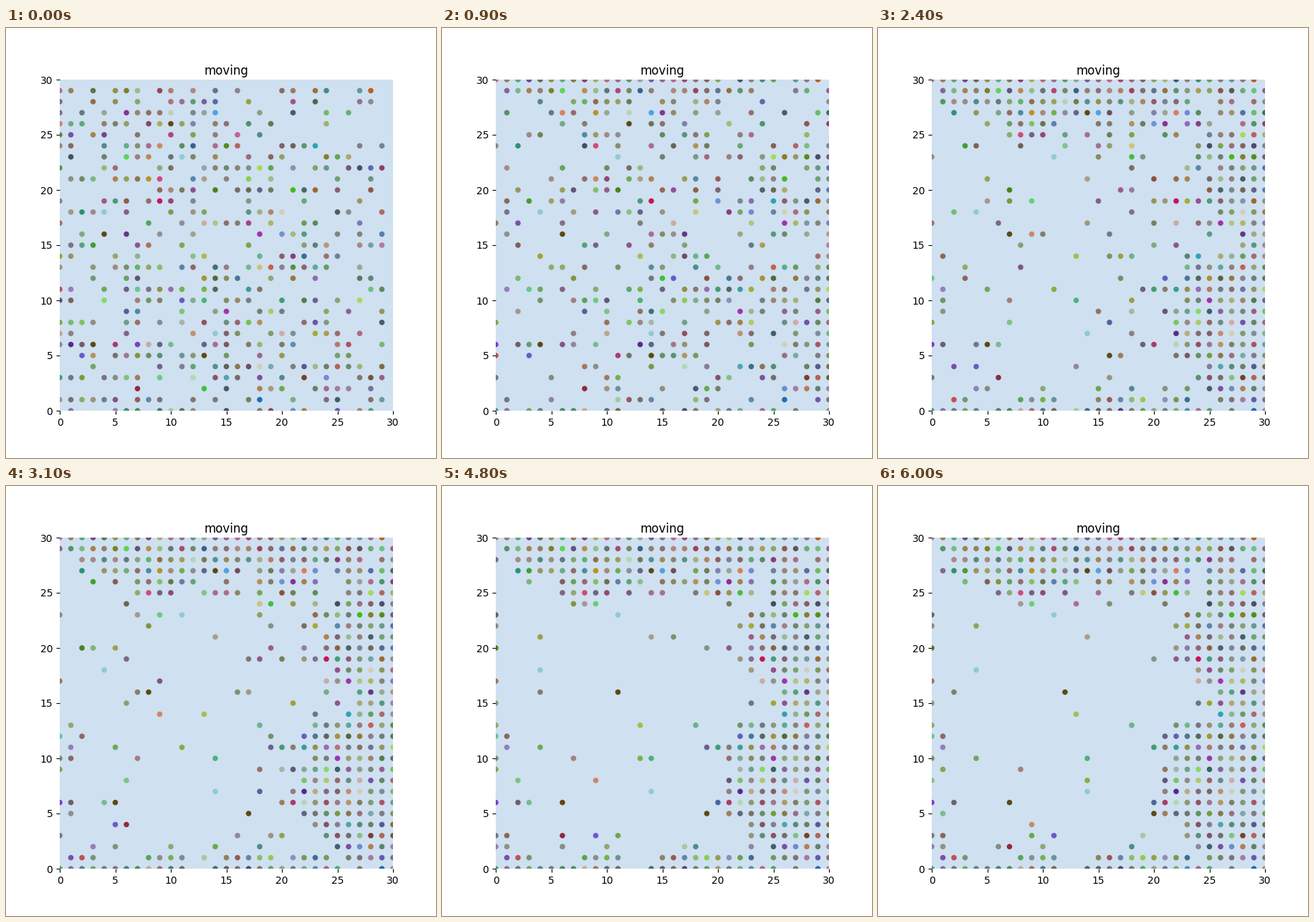
A matplotlib script that plays this animation: 600 by 600 pixels, repeating every 6100 ms.

```python
import random

import matplotlib.pyplot as plt
import numpy as np
from matplotlib.animation import FuncAnimation
from matplotlib.colors import to_rgb

SIZE = 30        # walls stand at 0 and SIZE
COUNT = 450
FRAMES = 61
INTERVAL = 100
REACH = 4        # how far a dot may hop to pass others

RIGHT, LEFT, UP, DOWN = (1, 0), (-1, 0), (0, 1), (0, -1)
STILL = (0, 0)

random.seed(12)

CYAN, UMBER, SAND = "#8fcad4", "#5c4a14", "#d5cdb8"
MINT, LIME, VIOLET = "#b3d6b3", "#a3dc55", "#a035ac"

# Striking dots: x, y, colour, heading, speed ahead, drift to the far side
LEADS = [
    (11, 23, CYAN, STILL, 0, 0),
    (4, 18, CYAN, STILL, 0, 0),
    (14, 7, CYAN, STILL, 0, 0),
    (1, 11, "#957fbf", STILL, 0, 0),
    (13, 10, "#4db37a", RIGHT, 0.02, 0),
    (9, 19, "#c8145c", RIGHT, 0.42, 0),
    (9, 21, "#d04a7a", UP, 0.21, 0.14),
    (6, 23, "#5fd455", UP, 0.6, 0.1),
    (14, 27, "#4fa3e0", UP, 0.12, 0.2),
    (18, 22, LIME, RIGHT, 0.65, 0.45),
    (27, 10, LIME, RIGHT, 0.22, 0.21),
    (20, 18, SAND, RIGHT, 0.45, 0.2),
    (18, 4, SAND, RIGHT, 0.6, 0.25),
    (12, 3, MINT, RIGHT, 0.3, 0.28),
    (10, 27, MINT, UP, 0.12, 0.32),
    (18, 16, VIOLET, RIGHT, 0.45, 0.1),
    (15, 9, VIOLET, RIGHT, 0.45, 0.3),
    (4, 16, UMBER, RIGHT, 0.1, 0),
    (3, 6, UMBER, RIGHT, 0.07, 0),
    (13, 5, UMBER, RIGHT, 0.12, 0),
    (10, 26, UMBER, UP, 0.05, 0.35),
    (2, 5, "#6a5acd", RIGHT, 0.1, -0.04),
]


def add(cell, way):
    return cell[0] + way[0], cell[1] + way[1]


def inside(cell):
    return 0 <= cell[0] <= SIZE and 0 <= cell[1] <= SIZE


def pace(speed, step, phase):
    """1, 0 or -1 cell for this step, spread evenly over time."""
    ticks = abs(speed) * step + phase
    moved = int(ticks) - int(ticks - abs(speed))
    return moved if speed > 0 else -moved


class Dot:
    def __init__(self, cell, color, heading, speed, drift,
                 wobble=0.0, phase=0.5):
        self.cell, self.color = cell, color
        self.heading, self.speed, self.drift = heading, speed, drift
        self.wobble, self.phase = wobble, phase
        self.settled = self.turned = False

    def side(self):
        return abs(self.heading[1]), abs(self.heading[0])

    def go(self, cell, grid):
        if not inside(cell) or cell in grid:
            return False
        del grid[self.cell]
        grid[cell] = self
        self.cell = cell
        return True

    def join(self, other, grid):
        """Come to rest against a settled dot, or roll off to the side."""
        dx, dy = self.side()
        ways = [(dx, dy), (-dx, -dy)]
        random.shuffle(ways)
        for way in ways:
            beside = add(self.cell, way)
            front = add(beside, self.heading)
            if inside(front) and front not in grid and self.go(beside, grid):
                return
        if other.heading == self.heading or self.turned:
            self.settled = True
        else:
            self.heading, self.drift, self.turned = other.heading, 0, True

    def advance(self, grid):
        cell = self.cell
        for hop in range(REACH):
            cell = add(cell, self.heading)
            if not inside(cell):
                self.settled = hop == 0
                return
            other = grid.get(cell)
            if other is None:
                self.go(cell, grid)
                return
            if other.settled:
                if hop == 0:
                    self.join(other, grid)
                return

    def move(self, step, grid):
        if self.settled:
            return
        if random.random() < self.wobble:
            way = random.choice((RIGHT, LEFT, UP, DOWN))
            self.go(add(self.cell, way), grid)
        slip = pace(self.drift, step, self.phase)
        if slip:
            dx, dy = self.side()
            self.go(add(self.cell, (slip * dx, slip * dy)), grid)
        if pace(self.speed, step, self.phase):
            self.advance(grid)


def muted_color():
    means = (0.52, 0.51, 0.46)
    return tuple(min(0.85, max(0.1, random.gauss(m, 0.125))) for m in means)


def habit():
    """Heading, speed, drift and wobble of an ordinary dot."""
    kind = random.random()
    aside = random.choice((0, random.uniform(0, 0.25)))
    if kind < 0.49:
        return RIGHT, random.uniform(0.25, 1), random.gauss(0.02, 0.05), 0.03
    if kind < 0.82:
        return UP, random.uniform(0.25, 0.9), aside, 0.02
    if kind < 0.91:
        return DOWN, random.uniform(0.25, 0.8), aside, 0.02
    if kind < 0.94:
        return LEFT, random.uniform(0.15, 0.4), 0, 0.04
    return STILL, 0, 0, random.choice((0.05, 0.2))


def build_dots():
    dots = [Dot((x, y), to_rgb(color), *rest) for x, y, color, *rest in LEADS]
    used = {d.cell for d in dots}
    free = [(x, y) for x in range(SIZE) for y in range(SIZE)
            if (x, y) not in used]
    for cell in random.sample(free, COUNT - len(dots)):
        dots.append(Dot(cell, muted_color(), *habit(), random.random()))
    return dots


def simulate(dots):
    grid = {d.cell: d for d in dots}
    path = [[d.cell for d in dots]]
    for step in range(1, FRAMES):
        # Dots closest to their wall go first so that lines can flow
        order = sorted(dots, key=lambda d: -np.dot(d.cell, d.heading))
        for dot in order:
            dot.move(step, grid)
        path.append([d.cell for d in dots])
    return np.array(path, dtype=float)


dots = build_dots()
path = simulate(dots)

fig, ax = plt.subplots(figsize=(6, 6), dpi=100)
ax.set_facecolor("#cfe0f0")
ax.set(xlim=(0, SIZE), ylim=(0, SIZE))
ax.set_title("moving", pad=5.3)
ax.spines[:].set_visible(False)
cloud = ax.scatter(path[0, :, 0], path[0, :, 1], s=30, linewidths=0,
                   c=[d.color for d in dots])


def draw(frame):
    cloud.set_offsets(path[frame])
    return (cloud,)


anim = FuncAnimation(fig, draw, frames=FRAMES, interval=INTERVAL,
                     repeat=True, repeat_delay=0)
plt.show()
```
